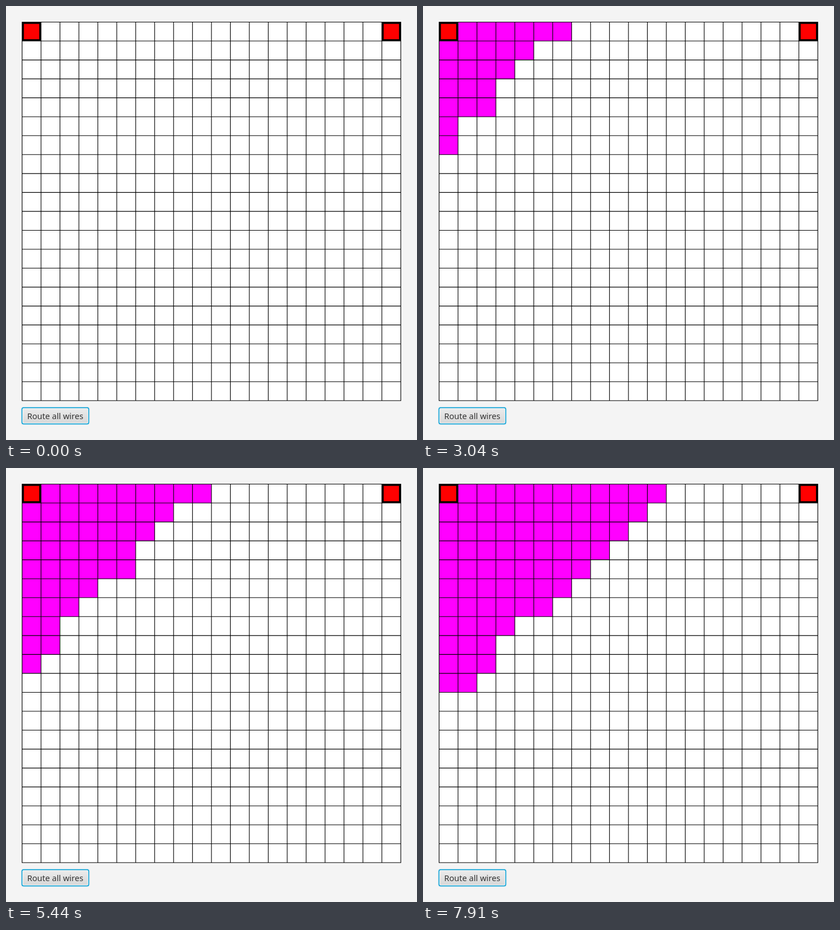
Recreate the animation shown at these times as an HTML page. Size 728 by 769 pixels, loop 7990 ms.

```html
<!DOCTYPE html>
<html lang="en">
<head>
<meta charset="utf-8">
<title>Wire routing</title>
<style>
  html, body { margin: 0; width: 100%; height: 100%; overflow: hidden; background: #f4f4f4; }
  svg { display: block; width: 728px; height: 769px; }
  text { font: 13px "Noto Sans", "Open Sans", sans-serif; fill: #333; }
</style>
</head>
<body>
<svg viewBox="0 0 728 769">
  <defs>
    <linearGradient id="body" x2="0" y2="1">
      <stop offset="0" stop-color="#ebebeb"/><stop offset="1" stop-color="#d8d8d8"/>
    </linearGradient>
    <linearGradient id="pressed" x2="0" y2="1">
      <stop offset="0" stop-color="#dedede"/><stop offset="1" stop-color="#cbcbcb"/>
    </linearGradient>
  </defs>
  <g transform="scale(1.118)">
    <rect x="25.5" y="25.5" width="600" height="600" fill="#fff"/>
    <g id="cells" fill="#f0f"></g>
    <path id="grid" fill="none" stroke="#000" stroke-linecap="square"/>
    <g id="pins" fill="#f00" stroke="#000" stroke-width="2.7"></g>
    <g id="button">
      <rect x="23.6" y="634.8" width="109.2" height="29.3" rx="4.4" fill="#039ed3" fill-opacity=".13"/>
      <rect x="24.7" y="635.9" width="107" height="27.1" rx="3.2" fill="#039ed3"/>
      <rect x="26" y="637.2" width="104.4" height="24.5" rx="2" fill="#f8f8f8"/>
      <rect id="face" x="27" y="638.2" width="102.4" height="22.5" rx="1" fill="url(#body)"/>
      <text x="33.6" y="654.4">Route all wires</text>
    </g>
  </g>
</svg>
<script>
const SIZE = 20, PITCH = 30, ORIGIN = 25.5, LOOP = 7990;
const PRESS = 660, RELEASE = 820, TICK = 80;
// Bursts of the search: first step, last step, cells visited
const bursts = [
  [900, 980, 2], [1140, 1450, 5], [1610, 1920, 5], [2090, 2480, 6],
  [2640, 2880, 4], [3040, 3350, 5], [3520, 3840, 5], [4000, 4240, 4],
  [4400, 4720, 5], [4880, 5270, 6], [5440, 5680, 4], [5840, 6230, 6],
  [6390, 6710, 5], [6870, 7190, 5], [7350, 7750, 6], [7910, 7910, 1]
];
const times = bursts.flatMap(([start, end, count]) =>
  Array.from({ length: count }, (_, i) => Math.min(start + TICK * i, end)));

const $ = id => document.getElementById(id);
const at = k => ORIGIN + k * PITCH;

function addRect(parent, x, y, size) {
  const rect = document.createElementNS("http://www.w3.org/2000/svg", "rect");
  for (const [name, value] of Object.entries({ x, y, width: size, height: size }))
    rect.setAttribute(name, value);
  return parent.appendChild(rect);
}

// Binary min-heap; its handling of ties decides the visiting order
class Heap {
  items = [];
  push(node) {
    const a = this.items;
    let k = a.length;
    while (k > 0) {
      const parent = (k - 1) >> 1;
      if (node.dist >= a[parent].dist) break;
      a[k] = a[parent];
      k = parent;
    }
    a[k] = node;
  }
  pop() {
    const a = this.items, top = a[0], node = a.pop(), n = a.length;
    if (!n) return top;
    let k = 0;
    while (2 * k + 1 < n) {
      let child = 2 * k + 1;
      if (child + 1 < n && a[child].dist > a[child + 1].dist) child++;
      if (node.dist <= a[child].dist) break;
      a[k] = a[child];
      k = child;
    }
    a[k] = node;
    return top;
  }
}

function visitOrder(count) {
  const heap = new Heap(), seen = new Set(), order = [];
  const discover = (x, y) => {
    const key = y * SIZE + x;
    if (x >= SIZE || y >= SIZE || seen.has(key)) return;
    seen.add(key);
    heap.push({ x, y, dist: x + y });
  };
  discover(0, 0);
  while (order.length <= count) {
    const node = heap.pop();
    order.push(node);
    discover(node.x, node.y + 1);
    discover(node.x + 1, node.y);
  }
  return order.slice(1);
}

let lines = "";
for (let k = 0; k <= SIZE; k++)
  lines += `M${at(k)} ${at(0)}V${at(SIZE)}M${at(0)} ${at(k)}H${at(SIZE)}`;
$("grid").setAttribute("d", lines);
for (const col of [0, SIZE - 1]) addRect($("pins"), at(col) + 1.5, at(0) + 1.5, PITCH - 3);

const cells = visitOrder(times.length).map(({ x, y }) =>
  addRect($("cells"), at(x), at(y), PITCH));

function draw(now) {
  const t = now % LOOP;
  cells.forEach((cell, i) => cell.setAttribute("visibility", t >= times[i] ? "visible" : "hidden"));
  const pressed = t >= PRESS && t < RELEASE;
  $("face").setAttribute("fill", pressed ? "url(#pressed)" : "url(#body)");
}

const begin = performance.now();
function frame() {
  draw(performance.now() - begin);
  requestAnimationFrame(frame);
}
frame();
</script>
</body>
</html>
```
